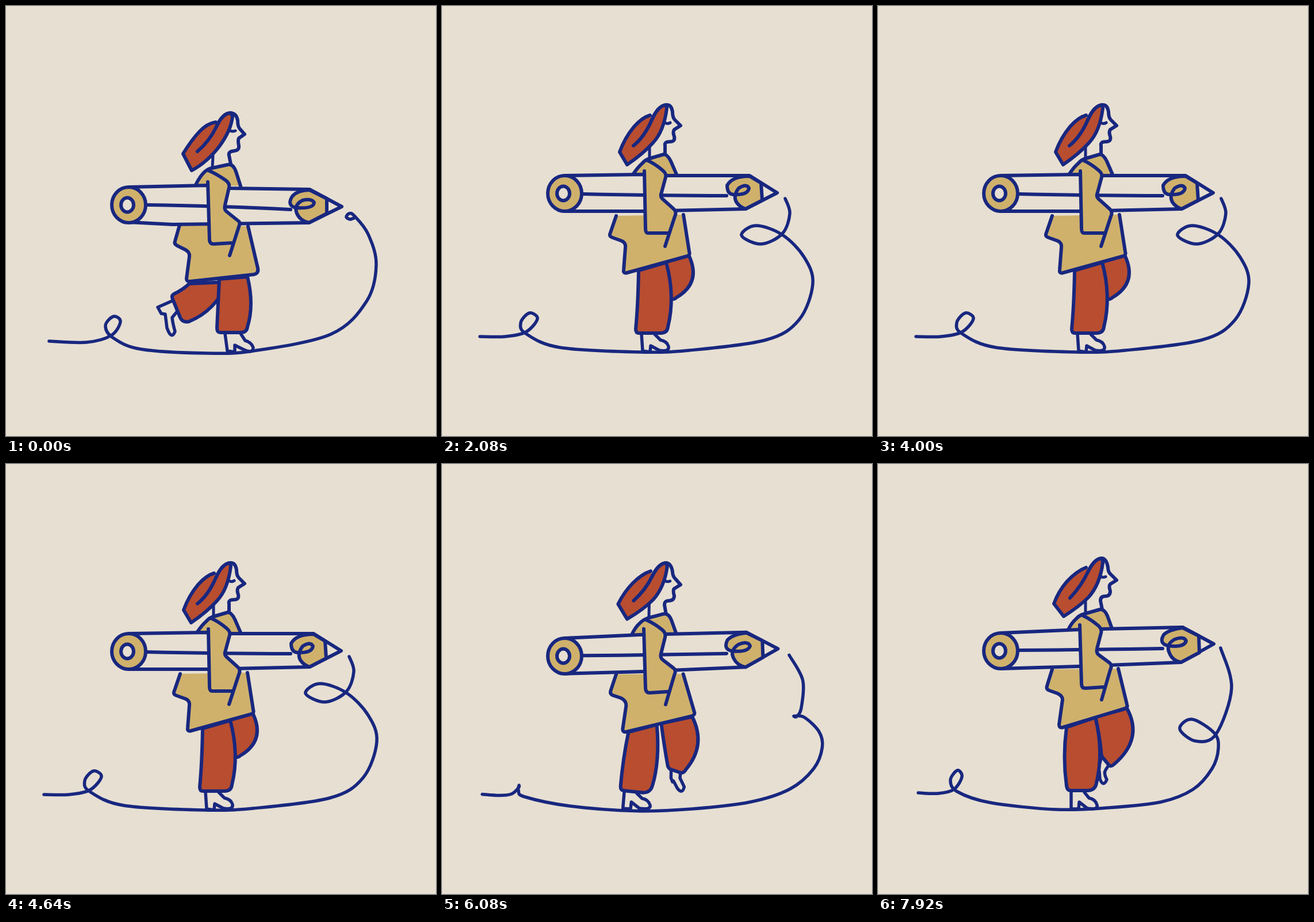
Recreate the animation shown at these times as an HTML page with a canvas. Size 748 by 748 pixels, loop 8000 ms.

```html
<!DOCTYPE html>
<html lang="en">
<head>
<meta charset="utf-8">
<title>Walking with a pencil</title>
<style>
html, body { margin: 0; height: 100%; overflow: hidden; background: #e7dfd2; }
canvas { display: block; width: 100vw; height: 100vh; }
</style>
</head>
<body>
<canvas id="stage" width="748" height="748"></canvas>
<script>
const ctx = document.getElementById('stage').getContext('2d');
const PAPER = '#e7dfd2', INK = '#18277f', GOLD = '#cfb16c', RED = '#b84d30';
const STEP = 80, LOOP = 8000, CYCLE = 8;

// Key poses by step of the walk; the steps between are blended.
const hair = {
  0: 'M365 202Q350 204 336 219Q322 234 308 257L323 286Q350 272 372 243Q392 215 394 192L391 186Q377 186 366 210',
  2: 'M362 190Q348 194 334 210Q318 229 309 254L322 276Q350 257 367 238Q386 218 391 178L390 172Q376 173 365 198',
  3: 'M362 180Q346 186 329 204Q314 221 306 243L323 265Q350 248 366 232Q386 210 391 172L390 164Q377 164 366 186',
  6: 'M365 199Q352 201 338 213Q322 226 307 245L320 279Q348 266 370 244Q388 223 393 194L391 188Q378 188 366 212'
};
const face = {
  0: 'M333 253Q354 235 366 210Q377 186 391 186Q401 187 403 199Q403 210 407 214L415 223L405 230Q403 234 405 243Q406 251 397 252Q386 253 388 260L391 275',
  2: 'M333 243Q352 228 365 198Q376 173 390 172Q399 171 401 184Q401 194 405 198L415 208L404 215Q401 219 404 227Q406 236 397 236Q386 236 388 243L388 258',
  3: 'M334 233Q354 212 366 186Q377 164 390 164Q398 166 400 180Q400 188 405 192L415 202L404 209Q401 212 404 221Q404 230 395 230Q387 230 387 238L390 253',
  6: 'M332 247Q353 236 366 212Q378 188 391 188Q400 188 403 202Q404 211 408 215L415 226L403 233Q402 237 404 246Q403 252 396 253Q386 253 387 260L389 275'
};
const eyeNeck = {
  0: 'M360 261L359 281M390 217Q394 219 399 217',
  2: 'M361 245L361 264M388 203Q392 206 397 203',
  3: 'M361 236L361 260M387 196Q392 198 396 196',
  6: 'M359 258L358 277M389 217Q393 221 398 219'
};
const shoulder = {
  0: 'M330 311Q338 295 346 288Q352 283 358 282L386 276Q395 274 400 288L408 313',
  2: 'M333 292Q341 280 348 274Q354 267 362 265L386 258Q392 258 398 270L408 293',
  3: 'M331 288Q337 276 344 270Q350 263 358 261L386 253Q394 252 399 264L407 286',
  6: 'M328 315Q335 299 344 291Q350 286 358 282L386 276Q394 275 399 286L408 312'
};
const coat = {
  0: 'M302 381L294 409Q292 414 298 417L312 424Q320 428 319 436L314 474Q314 480 321 479L431 467Q440 465 438 456L421 383',
  2: 'M303 365L292 397Q291 401 297 403L311 408Q320 411 319 420L316 459Q315 466 322 464L427 435Q432 433 430 427L420 363',
  3: 'M303 357L294 386Q292 392 298 394L312 399Q321 403 321 410L315 453Q315 460 322 458L430 425Q435 423 433 418L418 356',
  6: 'M303 383L292 412Q291 418 298 420L309 423Q320 428 319 441L313 477Q313 483 320 481L444 465Q453 463 450 456L423 384'
};
const arm = {
  0: 'M351 306L354 408Q355 414 361 414L395 412M389 434L406 381Q408 376 403 373L383 357Q379 353 381 346L388 316Q390 309 382 303Q366 292 352 286',
  2: 'M352 287L354 388Q354 396 360 395L395 395M388 418L405 366Q409 358 403 353L383 335Q379 331 382 324L389 298Q391 292 384 286Q370 274 356 268',
  3: 'M351 280L354 383Q354 390 361 390L392 388M389 410L404 358Q408 350 403 346L384 332Q379 328 381 321L388 294Q390 287 383 281Q370 270 357 264',
  6: 'M351 300L354 405Q355 414 362 414L394 412M389 435L405 383Q408 376 402 373L384 358Q379 354 381 347L388 317Q390 308 383 303Q366 291 352 286'
};
const barrel = {
  0: 'M213 315L350 312L388 317L528 319L584 349L527 377L290 380L213 376Z',
  2: 'M213 295L350 293L388 295L535 295L583 325L528 353L350 357L213 357Z',
  3: 'M213 294L350 288L388 287L530 284L584 313L527 345L350 352L213 356Z',
  6: 'M213 321L350 314L388 314L528 310L585 338L530 370L350 379L213 382Z'
};
const ridge = {
  0: 'M245 346Q380 348 495 354',
  2: 'M245 327Q380 330 495 330',
  3: 'M245 324Q380 323 495 321',
  6: 'M245 352Q380 350 495 347'
};
const wood = {
  0: 'M528 320Q508 320 498 331Q488 347 504 351Q535 353 536 342Q532 334 516 338Q500 346 506 361Q512 374 527 377L558 361L558 335Z',
  2: 'M535 296Q505 296 496 312Q496 328 508 328Q532 329 534 317Q530 308 516 317Q506 330 512 341Q518 350 528 353L557 338L555 308Z',
  3: 'M530 285Q506 288 497 297Q488 312 504 316Q532 320 536 308Q533 299 516 305Q500 314 507 329Q512 342 527 345L559 328L558 299Z',
  6: 'M528 311Q506 312 496 324Q490 342 505 344Q533 344 536 333Q531 323 513 333Q501 346 508 356Q515 367 530 370L557 353L556 324Z'
};
const capY = { 0: '346', 2: '326', 3: '325', 6: '352' };

// One leg over two steps: 0-5 swings forward, 6-14 stands.
const trouser = {
  0: 'M319 483Q307 494 292 501Q287 504 290 510L303 542Q307 551 318 549Q365 530 385 480Z',
  2: 'M370 450Q372 480 375 495Q378 503 385 506L401 510Q405 510 408 507Q452 481 429 433Z',
  3: 'M378 440Q386 475 388 500Q388 508 392 512L401 523Q405 528 411 522Q462 478 433 425Z',
  6: 'M388 474Q389 530 400 563Q402 570 408 569L440 564Q450 561 451 550Q456 512 440 469Z',
  8: 'M371 475Q369 520 367 560Q367 568 373 568L408 568Q419 568 420 558Q432 520 420 471Z',
  10: 'M342 460Q341 520 337 562Q337 569 343 569L380 569Q392 569 393 558Q406 505 390 446Z',
  11: 'M328 458Q321 510 328 560Q329 568 335 568L366 568Q378 567 380 555Q393 500 378 441Z',
  14: 'M317 483Q302 520 276 561Q273 567 280 569L318 579Q330 581 337 572Q352 550 365 478Z'
};
const shoe = {
  0: 'M289 513L264 524L270 535L277 536L280 560Q288 582 294 566Q290 552 289 542L298 531',
  2: 'M380 500L360 510L360 520L366 522L364 540Q366 552 374 545Q378 538 378 530L388 512',
  3: 'M389 508L386 520L383 530L385 535L386 548Q392 563 398 549Q392 538 396 532L402 523',
  6: 'M418 568L423 598L437 599L438 584L456 596Q470 600 468 587Q465 577 450 576L440 566',
  8: 'M381 570L385 600L398 602L398 590L412 597Q430 606 430 594Q427 585 416 582L407 568',
  10: 'M347 570L349 600L362 602L363 591L378 599Q396 602 394 592Q391 583 380 581L370 571',
  11: 'M336 570L336 600L349 600L350 588L364 599Q384 602 381 593Q378 583 367 581L359 571',
  14: 'M279 572L272 598L286 600L288 588L302 599Q324 602 324 594Q320 584 310 583L299 577'
};

// Points of the drawn line, from the pencil tip to its tail.
const trail = {
  0: '606 367 605 369 602 370 598 371 592 367 597 361 606 365 630 397 644 450 627 514 565 571 430 600 350 604 235 597 186 577 173 556 187 540 199 549 183 573 140 585 75 583',
  2: '597 335 605 361 592 396 555 414 521 399 546 382 592 398 630 437 645 483 621 546 563 581 430 599 345 602 205 594 146 570 137 551 152 534 166 544 146 567 110 575 66 575',
  3: '596 320 615 390 588 470 553 482 525 461 546 444 585 468 592 495 581 530 548 566 492 588 400 598 310 601 195 589 138 570 126 550 138 533 146 544 132 566 105 573 70 572',
  5: '612 345 640 362 662 378 682 396 700 416 714 437 726 462 731 490 712 530 662 565 580 588 470 602 365 606 250 601 150 588 140 586 130 585 120 583 110 582 95 580 70 577',
  6: '608 349 619 360 628 373 636 387 642 401 647 417 649 435 645 465 634 500 607 540 552 575 460 597 370 603 250 600 205 595 195 593 185 592 175 591 165 590 120 584 70 577'
};

const NUM = /-?\d+/g;

function blend(a, b, u) {
  const to = b.match(NUM);
  let i = 0;
  return a.replace(NUM, n => +n + (to[i++] - n) * u);
}

function poseAt(keys, t, period = CYCLE) {
  const times = Object.keys(keys).map(Number);
  const from = times.filter(k => k <= t).pop();
  const next = times.find(k => k > t) ?? period;
  return blend(keys[from], keys[next % period], (t - from) / (next - from));
}

function smooth(text) {
  const n = text.split(' ').map(Number), p = [];
  for (let i = 0; i < n.length; i += 2) p.push([n[i], n[i + 1]]);
  let d = 'M' + p[0];
  for (let i = 0; i < p.length - 1; i++) {
    const a = p[i], b = p[i + 1], before = p[i - 1] || a, after = p[i + 2] || b;
    const c1 = a.map((v, j) => v + (b[j] - before[j]) / 6);
    const c2 = b.map((v, j) => v - (after[j] - a[j]) / 6);
    d += `C${c1} ${c2} ${b}`;
  }
  return d;
}

const oval = (x, y, rx, ry) =>
  `M${x - rx} ${y}a${rx} ${ry} 0 1 1 ${2 * rx} 0a${rx} ${ry} 0 1 1 ${-2 * rx} 0Z`;

function paint(d, fill, width = 6) {
  const path = new Path2D(d);
  if (fill) {
    ctx.fillStyle = fill;
    ctx.fill(path);
  }
  ctx.lineWidth = width;
  ctx.stroke(path);
}

function drawLeg(t) {
  paint(poseAt(shoe, t, 2 * CYCLE), null, 5.5);
  paint(poseAt(trouser, t, 2 * CYCLE), RED);
}

function drawPencil(k) {
  const y = +poseAt(capY, k);
  paint(poseAt(barrel, k), PAPER);
  paint(poseAt(ridge, k));
  paint(poseAt(wood, k), GOLD);
  paint(oval(213.5, y, 29.5, 31), GOLD);
  paint(oval(211, y, 11, 12.5), PAPER);
}

function drawArm(k) {
  const d = poseAt(arm, k);
  ctx.fillStyle = GOLD;
  ctx.fill(new Path2D('M' + d.slice(1).replace('M', 'L')));
  paint(d);
}

function draw(k) {
  ctx.fillStyle = PAPER;
  ctx.fillRect(0, 0, 748, 748);
  ctx.strokeStyle = INK;
  ctx.lineCap = ctx.lineJoin = 'round';

  paint(smooth(poseAt(trail, k)), null, 5.5);
  const legs = k < 6 ? [k, k + CYCLE] : [k + CYCLE, k];
  legs.forEach(drawLeg);
  paint(poseAt(coat, k), GOLD);
  paint(poseAt(eyeNeck, k), null, 5);
  paint(poseAt(shoulder, k), GOLD);
  paint(poseAt(hair, k), RED);
  paint(poseAt(face, k));
  drawPencil(k);
  drawArm(k);
}

let shown = -1;
function tick(now) {
  const k = Math.floor(now % LOOP / STEP) % CYCLE;
  if (k !== shown) draw(shown = k);
  requestAnimationFrame(tick);
}
tick(0);
</script>
</body>
</html>
```
